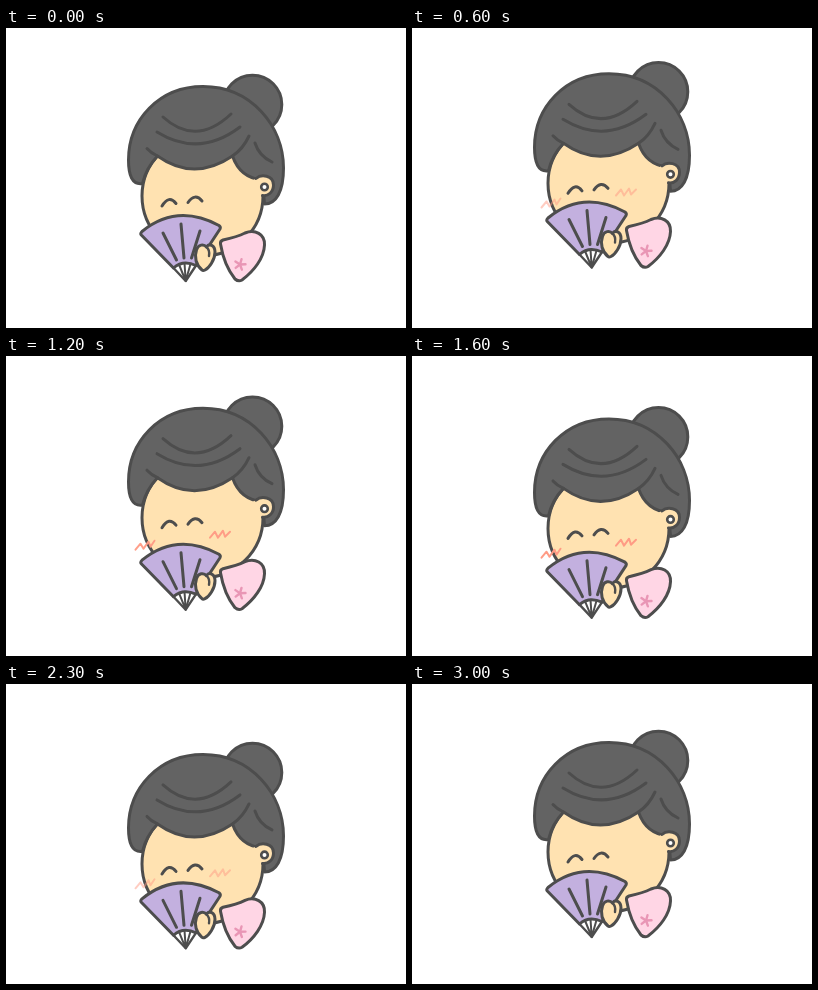
Recreate the animation shown at these times as an HTML page. Size 400 px wide and 300 px high, loop 3100 ms.

```html
<!DOCTYPE html>
<html lang="en">
<head>
<meta charset="utf-8">
<title>Laughing behind a fan</title>
<style>
  html, body { margin: 0; width: 100%; height: 100%; overflow: hidden; background: #fff; }
  svg { display: block; width: 100%; height: 100%; }
  .line { fill: none; }
  .skin { fill: #ffe2b1; }
  .hair { fill: #636363; }
</style>
</head>
<body>
<svg viewBox="0 0 400 300" stroke="#4d4d4d" stroke-width="3" stroke-linecap="round" stroke-linejoin="round">
  <g id="head">
    <circle class="hair" cx="246.500" cy="76.500" r="29.300"/>
    <ellipse class="skin" cx="196.500" cy="168" rx="60.500" ry="60"/>
    <path class="hair" d="M136.500 155.500C126 157 122.500 147 122.500 132C122.500 92 153 58.500 197 58.500C245 58.500 277.500 98 277.500 140C277.500 164 270 176 258.500 176L256.500 152Q234 150 226.500 128Q188 154 151.500 128Q140 140 136.500 155.500Z"/>
    <path class="line" d="M157 89Q190 119 225 86M151 104Q193 130 234 99M141 120.500Q145 125 151.500 128M226.500 128Q237 121 243 108M249 115Q253 128 266 134"/>
    <ellipse class="skin" cx="254" cy="158.500" rx="10" ry="9" stroke="none"/>
    <path class="skin" d="M250 150.500C255 146 267.500 147 267.500 157C267.500 164 262 168.500 256.500 167.500"/>
    <circle cx="258.500" cy="159" r="3.300" fill="#fff" stroke-width="2.600"/>
    <path class="line" d="M156 178Q163 166.500 170 175.500M182 174.500Q189 164.500 196 173"/>
  </g>
  <g id="body">
    <path id="blush" class="line" stroke="#ff9a84" stroke-width="2" d="M204 181l5-6 3 6 5-7 2 6 5-5M129.500 193l5-6 3 5 5-7 2 5 4-6"/>
    <path fill="#ffd6e5" d="M214.500 216Q214 213 217 212C224 210.500 233 208 239 205C249 201 259 206 258.500 217C258 230 248 243 236 252Q232.500 254 229 251C221 241 217 231 214.500 216Z"/>
    <g id="flower" stroke="#e996b5" stroke-width="2.400"></g>
    <path fill="#fff" stroke="none" d="M167.500 240L179.700 253L190 237.500L177 234Z"/>
    <path fill="#c3b0df" d="M135.300 207Q134 205.500 136 203.500Q171 175 213 197.500Q215 199 214 201L190 237.500Q177 231.500 167.500 240Z"/>
    <path class="line" d="M157 205L170.500 232M175 196L178 230M194 203L185.500 230"/>
    <path class="line" stroke-width="2.400" d="M167.500 240L179.700 253L190 237.500"/>
    <path class="line" stroke-width="2" d="M173 236.500L179.700 253L178.500 235M184.500 236L179.700 253"/>
    <path class="skin" d="M196 242C190 237 188 229 190.500 222C192 216 198 216 200.500 219C203 215 209 217 209 224C209 232 203 240 199 242Q197 243 196 242Z"/>
    <path class="line" stroke-width="2.400" d="M200.500 219Q204 222 203 228"/>
  </g>
</svg>
<script>
const LOOP = 3100, FRAME = 100, STEP = 300;
const headY = [0, -5.5, -12.7, -11.8, -6.3, 1.8, 9, 12.8, 10.7, 4.2, 0];
const bodyY = [0, -7.5, -13.5, -7.5, 0.7, 7, 11.3, 12.7, 10, 4, 0];
const glow = [0, 0.25, 0.5, 0.8, 0.95, 1, 0.88, 0.65, 0.42, 0.22, 0];
const $ = id => document.getElementById(id);

// Smooth curve through evenly spaced keys, resting at both ends.
function sample(keys, time) {
  const last = keys.length - 1;
  const x = Math.min(time / STEP, last);
  const i = Math.min(Math.floor(x), last - 1), u = x - i;
  const slope = k => k > 0 && k < last ? (keys[k + 1] - keys[k - 1]) / 2 : 0;
  const ease = u * u * (3 - 2 * u);
  return keys[i] + (keys[i + 1] - keys[i]) * ease
    + slope(i) * u * (1 - u) ** 2 - slope(i + 1) * u * u * (1 - u);
}

let petals = "";
for (let i = 0; i < 5; i++) petals += `<path d="M0 0V-5.5" transform="translate(234 236.5) rotate(${i * 72 + 16})"/>`;
$("flower").innerHTML = petals;

function draw(now) {
  const time = Math.floor(now % LOOP / FRAME) * FRAME;
  $("head").setAttribute("transform", `translate(0 ${sample(headY, time)})`);
  $("body").setAttribute("transform", `translate(0 ${sample(bodyY, time)})`);
  $("blush").setAttribute("opacity", sample(glow, time));
}

let start;
function tick(now) {
  start ??= now;
  draw(now - start);
  requestAnimationFrame(tick);
}
draw(0);
requestAnimationFrame(tick);
</script>
</body>
</html>
```
